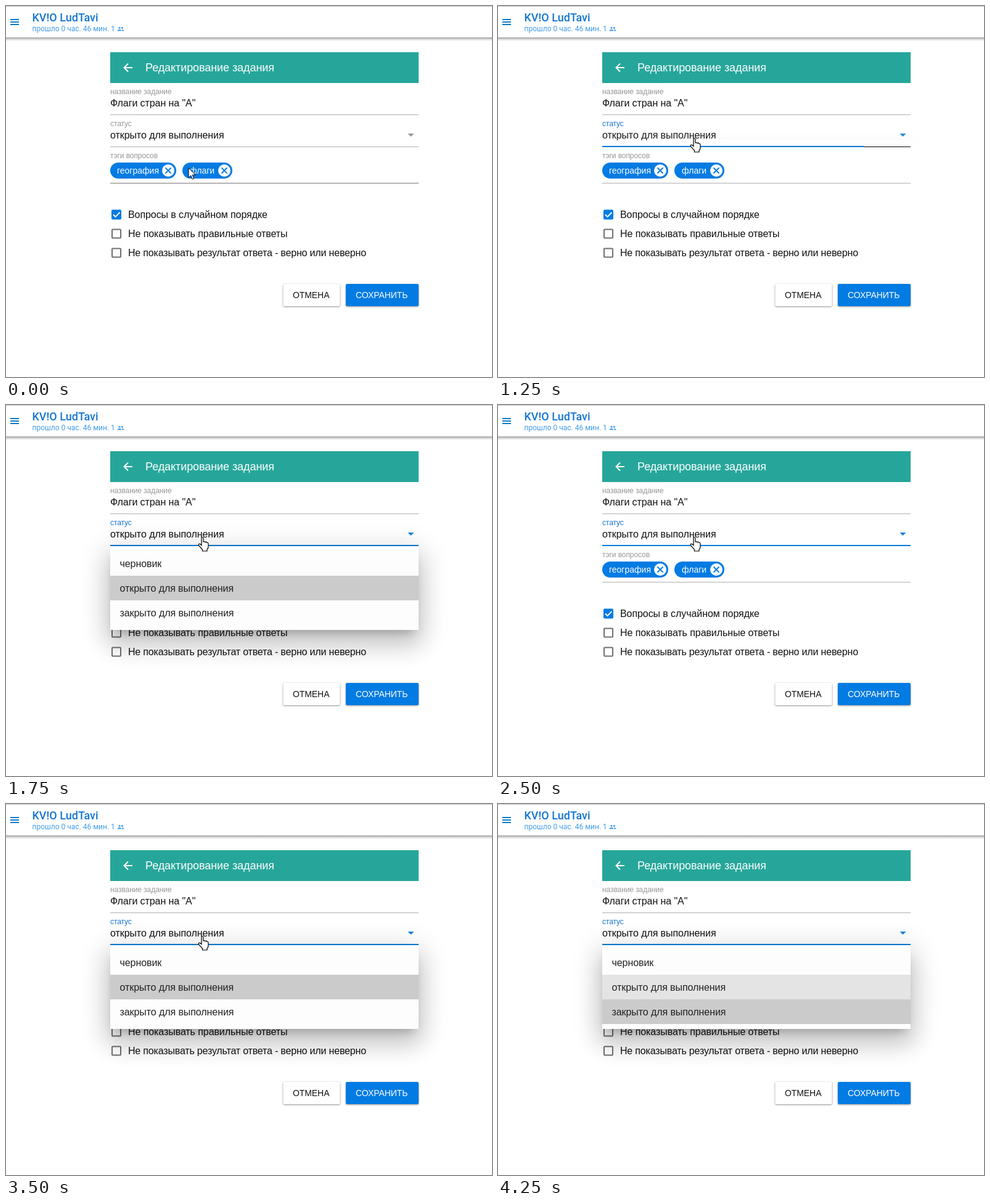
Animation of 788 by 602 pixels, one loop 5 s. Source, as an HTML page:

```html
<!DOCTYPE html>
<html lang="ru">
<head>
<meta charset="utf-8">
<title>Редактирование задания</title>
<style>
html, body { margin: 0; width: 100%; height: 100%; overflow: hidden; background: #fff; }
svg { display: block; width: 100vw; height: 100vh; }
text { font: 16px "Liberation Sans", Arial, sans-serif; letter-spacing: -.08px; fill: #111; white-space: pre; }
.brand { font: 500 18px Roboto, sans-serif; letter-spacing: 0; fill: #1576d2; }
.sub { font: 12px Roboto, sans-serif; letter-spacing: 0; fill: #429ce8; }
.title { font-size: 18px; fill: #fff; }
.label { font-size: 12px; fill: #979797; }
.chip { font-size: 14px; letter-spacing: 0; fill: #fff; }
.btn { font-size: 14px; }
.long { letter-spacing: -.18px; }
.lift { filter: drop-shadow(0 1px 1.5px rgba(0,0,0,.45)); }
</style>
</head>
<body>
<svg id="stage" viewBox="0 0 788 602">
  <defs>
    <linearGradient id="edge" x2="0" y2="1">
      <stop stop-color="#989898"/>
      <stop offset=".4" stop-color="#d0d0d0"/>
      <stop offset="1" stop-color="#fff"/>
    </linearGradient>
  </defs>
  <rect width="788" height="602" fill="#fff"/>
  <rect y="51" width="788" height="6" fill="url(#edge)"/>
  <rect width="788" height="1" fill="#c4c4c4"/>
  <path d="M7 22H21M7 26H21M7 30H21" stroke="#0b7cc8" stroke-width="2"/>
  <g fill="#429ce8">
    <circle cx="184" cy="35.5" r="1.6"/><circle cx="188.4" cy="35.5" r="1.6"/>
    <path d="M180.5 40.5V39.5Q184 36.6 187 39.5V40.5ZM188 40.5V38.2Q190.5 38 191.5 39.5V40.5Z"/>
  </g>
  <rect x="169" y="75" width="500" height="50" fill="#26a69a"/>
  <path d="M205 100H192M198 93.5L191.5 100L198 106.5" fill="none" stroke="#fff" stroke-width="2"/>
  <rect x="169" y="176" width="500" height="1" fill="#b0b0b0"/>
  <rect id="statusLine" x="169" y="228" width="500" height="1"/>
  <rect id="focusLine" x="169" y="227" height="2" fill="#027bd6"/>
  <rect id="tagLine" x="169" y="287" width="500" height="1"/>
  <path id="caret" d="M651.5 207H661.5L656.5 212Z"/>
  <g id="form"></g>
  <rect class="lift" x="449.5" y="451" width="92" height="36" rx="2" fill="#fff"/>
  <rect class="lift" x="551" y="451" width="118" height="36" rx="2" fill="#027be3"/>
  <g id="buttons"></g>
  <g id="menu"></g>
  <path id="arrow" d="M.5 .5V16.5L4.2 13L6.8 19L9.2 18L6.7 12H11.7Z" fill="#fff" stroke="#000"/>
  <path id="hand" transform="translate(312 214)" fill="#fff" stroke="#000" stroke-width="1.2"
    d="M5 2.5Q5 .5 6.5 .5T8 2.5V8Q10 6.8 11 8.6Q13 7.6 14 9.4Q16 9 16 11V16Q16 19 14 20.5V23H6.5V20.5L1 14.5Q-.5 12 1 11.4T5 13.5Z"/>
</svg>
<script>
const $ = id => document.getElementById(id);
const BLUE = '#027be3', GREY = '#b0b0b0', LOOP = 5000;

function add(parent, tag, attrs, content) {
  const el = document.createElementNS('http://www.w3.org/2000/svg', tag);
  for (const k in attrs) el.setAttribute(k, attrs[k]);
  if (content) el.textContent = content;
  parent.append(el);
  return el;
}
const label = (parent, x, y, content, cls = '', fill = '') =>
  add(parent, 'text', { x, y, class: cls, style: fill && 'fill:' + fill }, content);

const form = $('form'), menu = $('menu');

label(form, 42.5, 25, 'KV!O LudTavi', 'brand');
label(form, 42.5, 41, 'прошло 0 час. 46 мин.', 'sub');
label(form, 170, 41, '1', 'sub');
label(form, 226, 106, 'Редактирование задания', 'title');
label(form, 169, 143, 'название задание', 'label');
label(form, 169, 163, 'Флаги стран на "А"');
const statusLabel = label(form, 169, 195, 'статус', 'label');
label(form, 169, 215, 'открыто для выполнения');
label(form, 169, 247, 'тэги вопросов', 'label');

function chip(x, width, content, textX) {
  const cx = x + width - 13;
  add(form, 'rect', { x, y: 254, width, height: 26, rx: 13, fill: BLUE });
  label(form, textX, 272, content, 'chip');
  add(form, 'circle', { cx, cy: 267, r: 10, fill: '#fff' });
  add(form, 'path', {
    d: `M${cx - 4.5} 262.5l9 9m0 -9l-9 9`, stroke: BLUE, 'stroke-width': 1.8
  });
}
chip(169, 107, 'география', 180);
chip(286, 81, 'флаги', 298);

function checkbox(y, content, checked, cls) {
  add(form, 'rect', {
    x: 172, y: y - 7, width: 14, height: 14, rx: 1, 'stroke-width': 2,
    fill: checked ? BLUE : '#fff', stroke: checked ? BLUE : '#707070'
  });
  if (checked) add(form, 'path', {
    d: `M174 ${y}l3.5 3.6l7 -7.2`, fill: 'none', stroke: '#fff', 'stroke-width': 2
  });
  label(form, 198, y + 5.5, content, cls);
}
checkbox(338.5, 'Вопросы в случайном порядке', true);
checkbox(369.5, 'Не показывать правильные ответы');
checkbox(400.5, 'Не показывать результат ответа - верно или неверно', false, 'long');

label($('buttons'), 465, 474, 'ОТМЕНА', 'btn');
label($('buttons'), 567, 474, 'СОХРАНИТЬ', 'btn', '#fff');

// Layered elevation: offset, blur, spread, strength
for (const [dy, blur, grow, alpha] of [[11, 15, -7, .2], [24, 38, 3, .14], [9, 46, 8, .12]])
  add(menu, 'rect', {
    x: 169 - grow, y: 229 + dy - grow, width: 500 + 2 * grow, height: 136 + 2 * grow,
    opacity: alpha, style: `filter:blur(${blur / 2}px)`
  });
add(menu, 'rect', { x: 169, y: 229, width: 500, height: 136, fill: '#fdfdfd' });
const rows = ['черновик', 'открыто для выполнения', 'закрыто для выполнения'].map((name, i) => {
  const row = add(menu, 'rect', { x: 169, y: 237 + i * 40, width: 500, height: 40 });
  label(menu, 184.5, 263 + i * 40, name, '', '#222');
  return row;
});

// Each step keeps the values of the one before it
const steps = [
  { at: 0, status: GREY, tags: '#777', focus: 0, scale: 1, fade: 0, arrow: [295.5, 262], hand: 0, hover: 1 },
  { at: 250, tags: '#222', arrow: [308, 229] },
  { at: 500, status: '#555', tags: GREY, arrow: null, hand: 1 },
  { at: 750, status: '#000' },
  { at: 1250, focus: .85, scale: .15, fade: .05 },
  { at: 1500, focus: 1, scale: .95, fade: .95 },
  { at: 1750, scale: 1, fade: 1 },
  { at: 2500, fade: 0 },
  { at: 3250, scale: .775, fade: .66 },
  { at: 3500, scale: 1, fade: 1 },
  { at: 4000, hand: 0 },
  { at: 4250, hover: 2 }
];

const show = (el, on) => el.setAttribute('visibility', on ? 'visible' : 'hidden');

function draw(time) {
  const s = Object.assign({}, ...steps.filter(step => step.at <= time));
  $('statusLine').setAttribute('fill', s.status);
  $('tagLine').setAttribute('fill', s.tags);
  $('focusLine').setAttribute('width', 500 * s.focus);
  $('caret').setAttribute('fill', s.focus ? '#1482dc' : '#979797');
  statusLabel.style.fill = s.focus ? '#1976d2' : '#979797';
  show(menu, s.fade > 0);
  menu.setAttribute('opacity', s.fade);
  menu.setAttribute('transform', `translate(0 ${200 * (1 - s.scale)}) scale(1 ${s.scale})`);
  rows.forEach((row, i) =>
    row.setAttribute('fill', i === s.hover ? '#cbcbcb' : i === 1 ? '#e4e4e4' : 'none'));
  show($('hand'), s.hand);
  show($('arrow'), s.arrow);
  if (s.arrow) $('arrow').setAttribute('transform', `translate(${s.arrow})`);
}

const start = performance.now();
function tick() {
  draw((performance.now() - start) % LOOP);
  requestAnimationFrame(tick);
}
tick();
</script>
</body>
</html>
```
